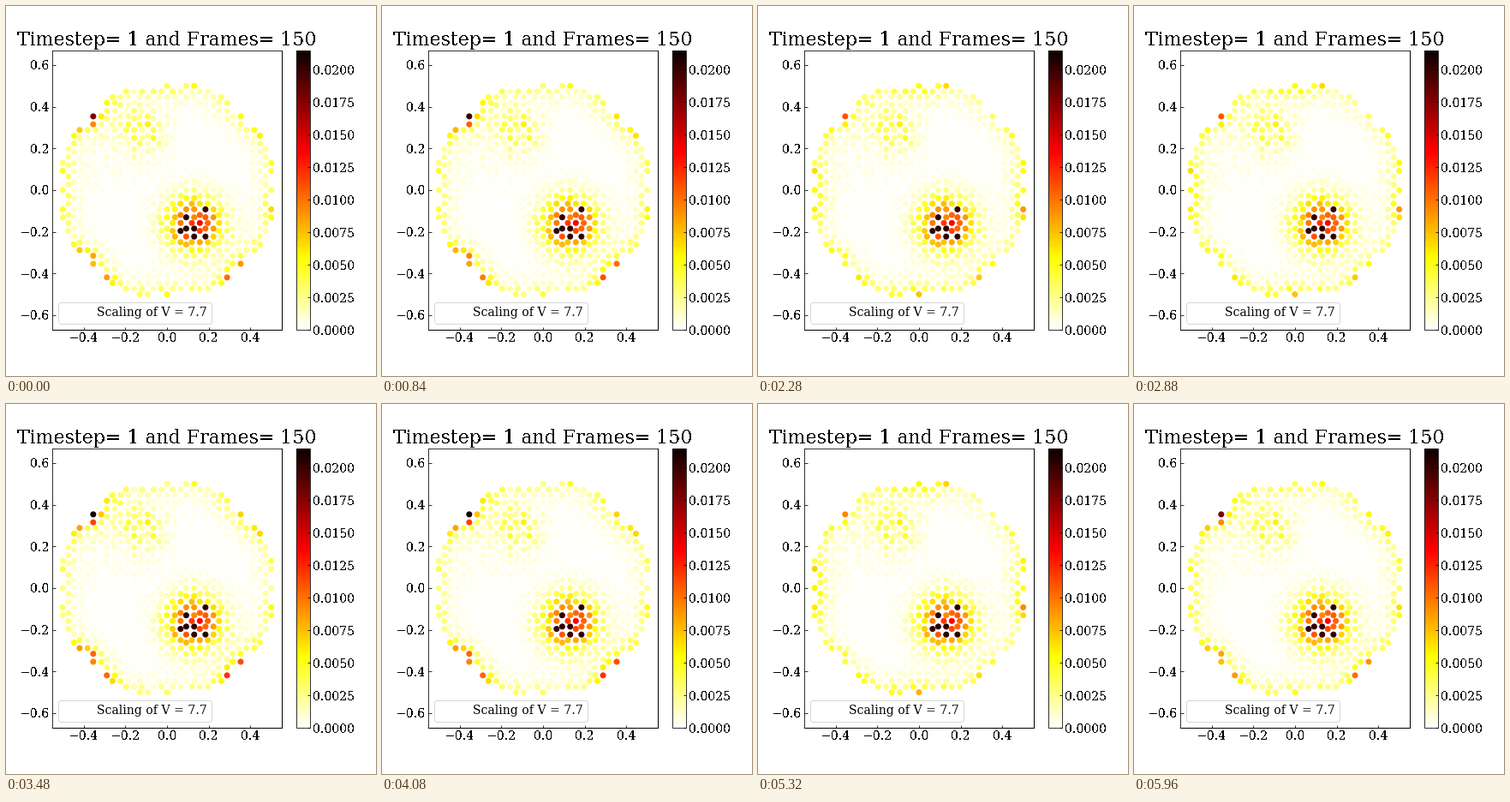
Animation, 432 px wide and 432 px high, one loop 6000 ms. Source, as a matplotlib script:

```python
import itertools

import matplotlib.pyplot as plt
import numpy as np
from matplotlib.animation import FuncAnimation

FRAMES, INTERVAL = 150, 40
PERIOD, CREST = 20, 4.5
EDGE = 0.03825          # side of a tile
RADIUS = 13.08          # inradius of the patch, in tile sides
VMAX = 0.02146

# densest sites of the bound state
HOT = [(.092, -.13), (.184, -.09), (.065, -.196), (.092, -.184),
       (.13, -.184), (.13, -.222), (.184, -.222)]

# x, y, strength of the brightest places on the rim
SPOTS = [(-.37, .35, .0135), (-.37, -.32, .006), (.35, -.37, .004),
         (.29, -.43, .004), (-.29, -.43, .004), (0, -.51, .003),
         (.51, -.09, .003)]


def octagon_norm(p):
    x, y = np.abs(p).T
    return np.maximum(np.maximum(x, y), (x + y) / np.sqrt(2))


def octagonal_tiling():
    """Vertices of an eight-fold tiling by cut and project from Z^4."""
    n = np.array(list(itertools.product(range(-9, 10), repeat=4)))
    angle = np.arange(4) * np.pi / 4
    real = n @ np.c_[np.cos(angle), np.sin(angle)]
    perp = n @ np.c_[np.cos(3 * angle), np.sin(3 * angle)]
    inside = octagon_norm(perp) < (1 + np.sqrt(2)) / 2
    pts = real[inside & (octagon_norm(real) < RADIUS)]
    clipped = (np.abs(pts[:, 1]) > 13) & (pts[:, 0] * pts[:, 1] < -1)
    return pts[~clipped]


tiles = octagonal_tiling()
sites = tiles * EDGE
depth = RADIUS - octagon_norm(tiles)
rng = np.random.default_rng(4)


def distance(x, y):
    return np.hypot(sites[:, 0] - x, sites[:, 1] - y)


def blob(x, y, width):
    return np.exp(-(distance(x, y) / width) ** 2)


def noise(low, high):
    return rng.uniform(low, high, len(sites))


rim = 0.0052 * np.exp(-depth / 1.1) * noise(.5, 1.2)
for x, y, strength in SPOTS:
    rim += strength * blob(x, y, .04)

still = 0.014 * blob(.13, -.165, .13) * noise(.7, 1.1)
still += 0.0055 * blob(-.12, .28, .1) * noise(.1, 1.2)
still += 0.0012 * blob(-.25, .3, .25) * noise(0, 1) + 0.0001
for x, y in HOT:
    still[np.argmin(distance(x, y))] = 0.0203

# standing wave: diagonals and axes take turns
mode = -np.cos(4 * np.arctan2(sites[:, 1], sites[:, 0]))


def density(t):
    wave = np.cos(2 * np.pi * (t - CREST) / PERIOD)
    return still + rim * (1 + 0.5 * mode * wave)


plt.rcParams.update({
    "font.family": "DejaVu Serif",
    "font.size": 14,
    "text.antialiased": False,
    "xtick.direction": "in",
    "ytick.direction": "in",
})

fig = plt.figure(figsize=(6, 6), dpi=72)
ax = fig.add_axes([.125, .125, .62, .755])
dots = ax.scatter(*sites.T, c=density(0), s=36, linewidths=1,
                  cmap="hot_r", vmin=0, vmax=VMAX)
ax.set(xlim=(-.55, .55), ylim=(-.67, .67),
       xticks=np.arange(-2, 3) * .2, yticks=np.arange(-3, 4) * .2)
ax.spines[["right", "bottom"]].set_linewidth(1)
ax.set_title("Timestep= 1 and Frames= 150", fontsize=22)
ax.plot([], [], " ", label="Scaling of V = 7.7")
legend = ax.legend(loc="lower left")
for text in legend.get_texts():
    text.set_antialiased(True)

cax = fig.add_axes([.78375, .125, .03775, .755])
fig.colorbar(dots, cax=cax, ticks=np.arange(9) * .0025)


def update(t):
    dots.set_array(density(t))
    return (dots,)


anim = FuncAnimation(fig, update, frames=FRAMES, interval=INTERVAL,
                     repeat=True, repeat_delay=0)
plt.show()
```
